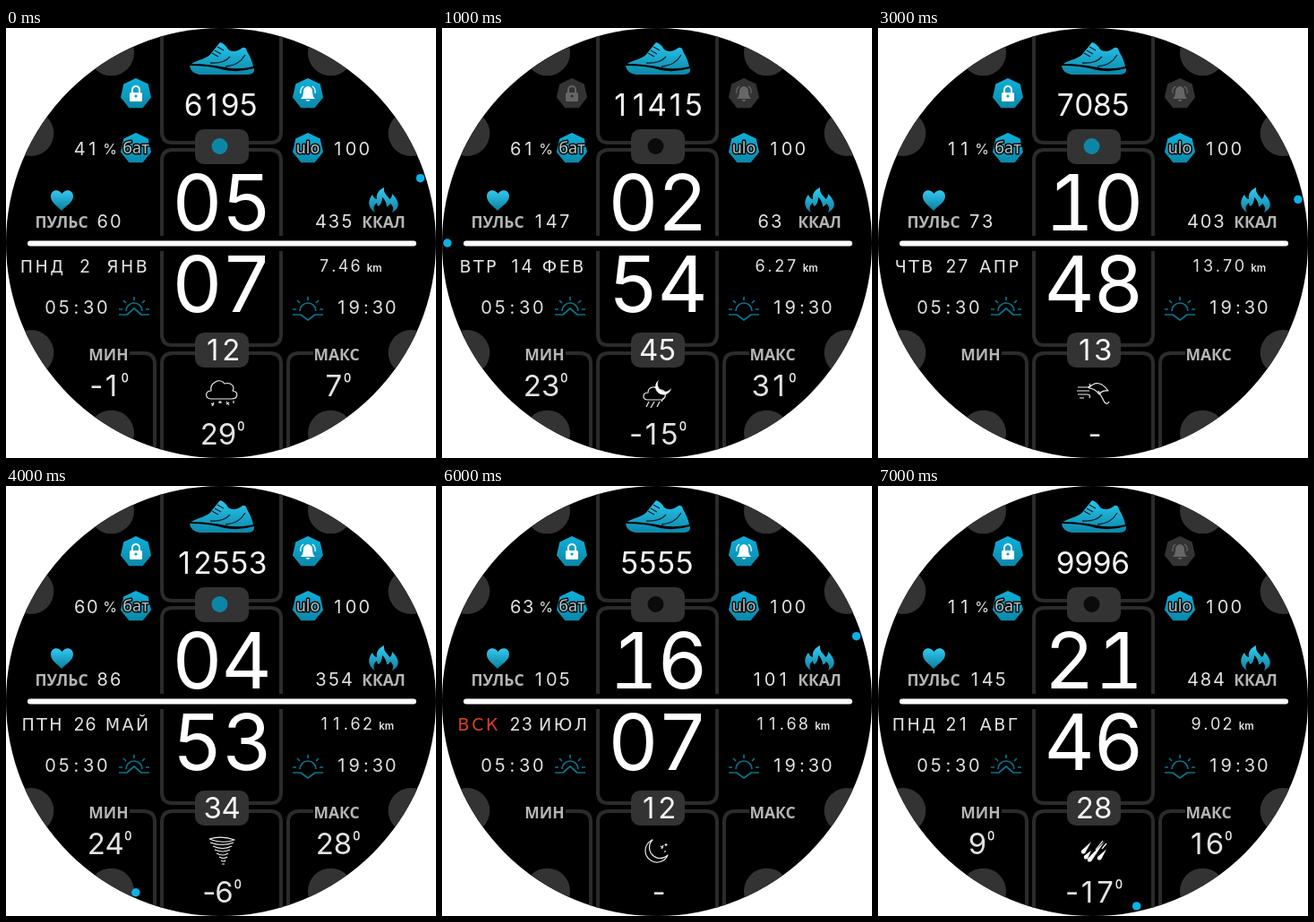
These frames come from a looping animation (480x480 px, 8 s). An HTML page with a canvas:

```html
<!DOCTYPE html>
<html lang="ru">
<head>
<meta charset="utf-8">
<title>Watch face</title>
<style>
html, body { margin: 0; width: 100%; height: 100%; overflow: hidden; background: #fff; }
canvas { display: block; width: 100vw; height: 100vh; }
</style>
</head>
<body>
<canvas id="stage" width="480" height="480"></canvas>
<script>
const ctx = document.getElementById('stage').getContext('2d');
const TAU = Math.PI * 2;
const GREY = '#333', FRAME = '#2b2b2b', CYAN = '#0ba4cb', DEEP = '#0a738c', PALE = '#e2e2e2';
const DIGITS = 'Inter, "Liberation Sans", sans-serif';
const LABELS = '"Noto Sans", "Open Sans", sans-serif';
const WIDE = '"DejaVu Sans", sans-serif';
const STEP = 1000;

const CLOUD = 'M228 414C222 413 222 405 229 405C227 396 239 390 244 397C251 395 256 400 253 405C260 406 259 414 252 414Z';
const WEATHER = {
  snow: CLOUD + 'M229 419l3 2m0-3l-2 4M239 416v3m-2-1h4M246 420l3-2m-3-1l3 4M254 416v3',
  nightRain: 'M229 415C223 414 224 407 230 407C230 400 239 399 242 404C249 403 252 411 246 415ZM231 417l-3 6M237 417l-4 7M243 417l-3 6M247 413l-2 4',
  rain: CLOUD + 'M232 417l-3 5M240 417l-3 6M248 417l-3 5',
  wind: 'M223 401h11q4-1 2-4M222 405h14M223 409h10q5 0 3 4M225 413h5M235 402Q246 390 257 405Q250 404 247 409Q242 402 235 402M246 405l7 13q3 3 5-1',
  tornado: 'M227 394q14-4 28 1q-12 5-28-1M228 398q13 5 26 0M231 402q11 5 21 0M233 406q9 4 17 0M235 410q7 4 13 0M238 414q5 3 9 0M240 418q3 2 5 0M241 422h3',
  cloud: CLOUD,
  moon: 'M235 395A13 13 0 1 0 252 412A12 12 0 0 1 235 395ZM244 402l3 2m0-3l-2 4M250 399v3m-1.5-1.5h3M249 407v2',
  meteors: ''
};

const states = [
  { steps: '6195', time: ['05', '07'], sec: 12, bat: 41, pulse: 60, kcal: 435, date: ['ПНД', 2, 'ЯНВ'], km: '7.46',
    min: '-1°', max: '7°', now: '29°', sky: 'snow', lock: 1, bell: 1, link: 1 },
  { steps: '11415', time: ['02', '54'], sec: 45, bat: 61, pulse: 147, kcal: 63, date: ['ВТР', 14, 'ФЕВ'], km: '6.27',
    min: '23°', max: '31°', now: '-15°', sky: 'nightRain', lock: 0, bell: 0, link: 0 },
  { steps: '8240', time: ['08', '36'], sec: 47, bat: 82, pulse: 118, kcal: 275, date: ['СРД', 18, 'МАР'], km: '8.35',
    min: '12°', max: '20°', now: '16°', sky: 'rain', lock: 1, bell: 1, link: 0 },
  { steps: '7085', time: ['10', '48'], sec: 13, bat: 11, pulse: 73, kcal: 403, date: ['ЧТВ', 27, 'АПР'], km: '13.70',
    min: '', max: '', now: '-', sky: 'wind', lock: 1, bell: 0, link: 1 },
  { steps: '12553', time: ['04', '53'], sec: 34, bat: 60, pulse: 86, kcal: 354, date: ['ПТН', 26, 'МАЙ'], km: '11.62',
    min: '24°', max: '28°', now: '-6°', sky: 'tornado', lock: 1, bell: 1, link: 1 },
  { steps: '9318', time: ['13', '29'], sec: 43, bat: 47, pulse: 92, kcal: 226, date: ['СБТ', 24, 'ИЮН'], km: '9.54',
    min: '14°', max: '22°', now: '18°', sky: 'cloud', lock: 1, bell: 1, link: 0 },
  { steps: '5555', time: ['16', '07'], sec: 12, bat: 63, pulse: 105, kcal: 101, date: ['ВСК', 23, 'ИЮЛ'], km: '11.68',
    min: '', max: '', now: '-', sky: 'moon', lock: 1, bell: 1, link: 0 },
  { steps: '9996', time: ['21', '46'], sec: 28, bat: 11, pulse: 145, kcal: 484, date: ['ПНД', 21, 'АВГ'], km: '9.02',
    min: '9°', max: '16°', now: '-17°', sky: 'meteors', lock: 1, bell: 0, link: 0 }
];

function disc(x, y, r, color) {
  ctx.fillStyle = color;
  ctx.beginPath();
  ctx.arc(x, y, r, 0, TAU);
  ctx.fill();
}

function box(x, y, w, h, r, color) {
  ctx.fillStyle = color;
  ctx.beginPath();
  ctx.roundRect(x, y, w, h, r);
  ctx.fill();
}

function fill(d, color) {
  ctx.fillStyle = color;
  ctx.fill(new Path2D(d));
}

function line(d, color, width) {
  ctx.strokeStyle = color;
  ctx.lineWidth = width;
  ctx.stroke(new Path2D(d));
}

function shade(top, bottom, from = '#20bde6', to = '#0a7e9c') {
  const g = ctx.createLinearGradient(0, top, 0, bottom);
  g.addColorStop(0, from);
  g.addColorStop(1, to);
  return g;
}

function text(str, x, y, font, color, align = 'center', spacing = 0) {
  ctx.font = font;
  ctx.fillStyle = color;
  ctx.textAlign = align;
  ctx.letterSpacing = spacing + 'px';
  ctx.fillText(str, x + (align === 'center' ? spacing / 2 : 0), y);
  ctx.letterSpacing = '0px';
}

// Tabular figures: every digit sits in a cell of equal width.
const CELL = { '.': 0.6, ':': 0.8, '-': 0.65, '°': 0.5 };
function figures(value, x, y, size, pitch, centered = false, color = PALE) {
  const chars = [...String(value)];
  const widthOf = c => (CELL[c] || 1) * pitch;
  if (centered) x -= chars.reduce((sum, c) => sum + widthOf(c), 0) / 2;
  for (const c of chars) {
    const w = widthOf(c), mid = x + w / 2;
    if (c === '°') {
      ctx.strokeStyle = color;
      ctx.lineWidth = 1.6;
      ctx.beginPath();
      ctx.ellipse(mid, y - size * 0.63, 2.7, 4.5, 0, 0, TAU);
      ctx.stroke();
    } else {
      text(c, mid, y, `400 ${size}px ${DIGITS}`, color);
      if (c === '1' && size > 60) box(mid - 18, y - 6, 38, 6, 0, color);
    }
    x += w;
  }
  return x;
}

function badge(x, y, on) {
  ctx.fillStyle = on ? shade(y - 17, y + 17, '#0fb0da', '#0a87a8') : GREY;
  ctx.beginPath();
  for (let i = 0; i < 7; i++) {
    const a = i * TAU / 7;
    ctx.lineTo(x + 17.5 * Math.sin(a), y + 0.5 - 17.5 * Math.cos(a));
  }
  ctx.fill();
}

function badgeText(str, x, y) {
  badge(x, y, true);
  ctx.font = `400 18px ${LABELS}`;
  ctx.textAlign = 'center';
  ctx.lineWidth = 3;
  ctx.strokeStyle = '#080808';
  ctx.strokeText(str, x, y + 6);
  text(str, x, y + 6, ctx.font, '#b8c4c8');
}

function lock(on) {
  const color = on ? '#fff' : '#666';
  badge(145, 73, on);
  box(138, 72, 14, 10, 1.5, color);
  line('M141 72V69a4 4 0 0 1 8 0V72', color, 2);
  disc(145, 76, 1.6, on ? CYAN : GREY);
}

function bell(on) {
  const color = on ? '#fff' : '#666';
  badge(337, 73, on);
  fill('M329 79Q332 76 332 71Q332 66 337 65Q342 66 342 71Q342 76 345 79ZM334.5 80h5q-2.5 4-5 0', color);
  line('M329 73q-1-5 3-8M345 73q1-5-3-8', color, 1.2);
}

function shoe() {
  const g = shade(15, 53, '#29c8f0', '#0b86a8');
  fill('M207 40C214 35 225 35 230 27L239 16Q245 18 248 24Q255 29 264 22Q268 21 269 26Q275 36 276 43Q260 47 245 44Q225 40 207 40Z', g);
  fill('M205 42Q228 42 244 47Q260 50 277 45Q278 52 270 52H216Q206 50 205 42Z', g);
  line('M230 28l7 4M233 25l7 4M236 21l7 4M228 39Q243 40 250 32M245 43Q260 42 267 30', '#05232c', 1.3);
}

function heart() {
  fill('M62 204C57 198 50 195 50 188C50 180 59 179 62.5 185C66 179 75 180 75 188C75 195 67 198 62 204Z',
    shade(180, 204, '#35cdf5', '#0a7f9e'));
}

function flame() {
  const g = shade(178, 207, '#35cdf5', '#0a7f9e');
  fill('M412 206C403 200 404 192 409 186Q411 191 414 191C413 185 416 181 422 178C421 186 427 187 428 191Q431 190 431 185C440 194 440 201 431 206Q434 200 429 196Q427 200 425 199Q424 192 420 189Q420 196 416 199Q414 198 414 195Q408 200 412 206Z', g);
}

function sun(x, tip) {
  ctx.save();
  ctx.translate(x, 0);
  line(`M-17 320H-8L0 ${tip}L8 320H17M-9 316a9 9 0 1 1 18 0M0 300v4M-12 304l3 3M12 304l-3 3M-17 314h4M17 314h-4`, DEEP, 1.7);
  ctx.restore();
}

function weather(kind) {
  line(WEATHER[kind], '#eee', 1.2);
  if (kind === 'nightRain') fill('M242 393A9 9 0 1 0 256 402A8 8 0 0 1 242 393Z', '#fff');
  if (kind === 'meteors') {
    for (const [x, y, n] of [[229, 408, 9], [236, 417, 17], [247, 415, 8], [232, 414, 6]]) {
      fill(`M${x - 2} ${y - 1}L${x + n} ${y - n * 1.2}L${x + 2} ${y + 2}Q${x - 3} ${y + 4} ${x - 2} ${y - 1}Z`, '#fff');
    }
    line('M243 406l8-10M250 405l5-6', '#fff', 1.2);
  }
}

function backdrop() {
  for (let hour = 0; hour < 12; hour++) {
    if (hour % 3 === 0) continue;
    const a = hour * TAU / 12;
    disc(240 + 245 * Math.sin(a), 240 - 245 * Math.cos(a), 25.5, GREY);
  }
  line('M174 0V116Q174 128 186 128H295Q307 128 307 116V0' +
    'M174 232V148Q174 136 186 136H295Q307 136 307 148V232' +
    'M174 249V342Q174 354 186 354H295Q307 354 307 342V249' +
    'M174 480V375Q174 363 186 363H295Q307 363 307 375V480' +
    'M138 363H154Q166 363 166 375V480M343 363H327Q315 363 315 375V480', FRAME, 4);
  box(211, 113, 60, 39, 10, GREY);
  box(211, 340, 60, 39, 10, GREY);
  box(24, 237.5, 434, 6, 3, '#fff');

  shoe();
  heart();
  flame();
  sun(143, 313);
  sun(337, 326);
  badgeText('бат', 145, 134);
  badgeText('ulo', 337, 134);
  const label = `600 17.5px ${LABELS}`;
  text('ПУЛЬС', 62, 223, label, '#b5b5b5');
  text('ККАЛ', 421.5, 223, label, '#b5b5b5');
  text('МИН', 114.5, 371, label, '#b5b5b5');
  text('МАКС', 369, 371, label, '#b5b5b5');
  figures('100', 363, 142, 20, 14.7);
  figures('05:30', 42, 319, 20, 15.2);
  figures('19:30', 367, 319, 20, 14.5);
}

function readings(s) {
  lock(s.lock);
  bell(s.bell);
  disc(238.5, 132, 9, s.link ? '#0d86a5' : '#0b0b0b');

  figures(s.steps, 240, 98, 33.5, 20.5, true, '#f4f4f4');
  figures(s.time[0], 241, 226, 87, 55, true, '#fff');
  figures(s.time[1], 241, 317, 87, 55, true, '#fff');
  figures(String(s.sec).padStart(2, '0'), 241, 371, 33, 20.5, true, '#f4f4f4');

  figures(s.bat, 75, 142, 20, 14.2);
  text('%', 116, 141, `400 16px ${DIGITS}`, PALE);
  figures(s.pulse, 100.5, 223, 20, 14.5);
  figures(s.kcal, 366, 223, 20, 14.5, true);

  const [weekday, day, month] = s.date;
  const dateFont = `400 19px ${WIDE}`;
  const weekend = weekday === 'СБТ' || weekday === 'ВСК';
  text(weekday, 40, 273, dateFont, weekend ? '#d8421f' : PALE, 'center', 2.5);
  figures(day, 88, 273, 19.5, 13.3, true);
  text(month, 135, 273, dateFont, PALE, 'center', 2.5);
  const end = figures(s.km, 348.5, 272, 18, 13.4);
  text('km', end + 6, 272, `600 11.5px ${DIGITS}`, PALE, 'left');

  figures(s.min, 116, 411, 33, 20.3, true);
  figures(s.max, 371, 411, 33, 20.3, true);
  figures(s.now, 242, 465, 33, 20.3, true);
  weather(s.sky);

  const a = s.sec * TAU / 60;
  disc(240 + 234 * Math.sin(a), 240 - 234 * Math.cos(a), 4.7, '#0bb2e8');
}

function draw(now) {
  ctx.fillStyle = '#fff';
  ctx.fillRect(0, 0, 480, 480);
  ctx.save();
  ctx.beginPath();
  ctx.arc(240, 240, 240, 0, TAU);
  ctx.clip();
  ctx.fillStyle = '#000';
  ctx.fillRect(0, 0, 480, 480);
  ctx.lineJoin = 'round';
  backdrop();
  readings(states[Math.floor(now / STEP) % states.length]);
  ctx.restore();
}

const start = performance.now();
function tick() {
  draw(performance.now() - start);
  requestAnimationFrame(tick);
}
tick();
</script>
</body>
</html>
```
